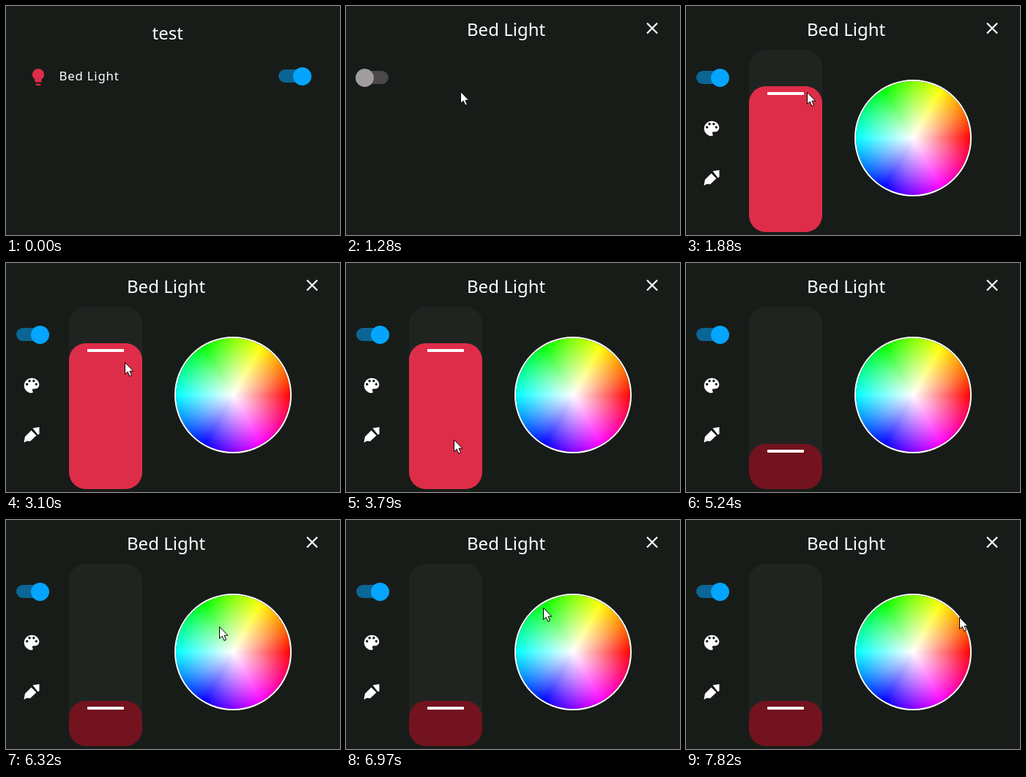
An HTML page that plays this animation: 456x314 px, repeating every 8000 ms.

```html
<!DOCTYPE html>
<html lang="en">
<head>
<meta charset="utf-8">
<title>Light control</title>
<style>
  html, body { margin: 0; width: 456px; height: 314px; overflow: hidden; background: #181c18; }
  svg, #wheel { position: absolute; left: 0; top: 0; }
  #wheel {
    left: 230px; top: 101px; width: 156px; height: 156px;
    border: 2px solid #fff; border-radius: 50%;
    background:
      radial-gradient(closest-side, #fff, #fff0) padding-box,
      conic-gradient(from 90deg, red, magenta, blue, cyan, lime, yellow, red) padding-box;
  }
  text { font: 24px "Noto Sans", sans-serif; fill: #fff; }
  .row { font-size: 16.8px; letter-spacing: .8px; }
  .track { fill: #0b6695; }
  .thumb { fill: #03a5ff; }
  .off .track { fill: #4a484a; }
  .off .thumb { fill: #a09c9f; }
</style>
</head>
<body>
<div id="wheel"></div>
<svg width="456" height="314" fill="#fff">
  <defs>
    <g id="track"><rect x="14" y="89" width="44" height="18" rx="9"/></g>
    <clipPath id="shell"><rect x="86" y="60" width="100" height="250" rx="23"/></clipPath>
  </defs>

  <g id="card">
    <text x="199.5" y="46">test</text>
    <path fill="#de2d4b" transform="translate(30.2 83.7) scale(1.15)" d="M12 2A7 7 0 0 0 5 9C5 11.4 6.2 13.5 8 14.7V17A1 1 0 0 0 9 18H15A1 1 0 0 0 16 17V14.7C17.8 13.5 19 11.4 19 9A7 7 0 0 0 12 2M9 20V21A1 1 0 0 0 10 22H14A1 1 0 0 0 15 21V20Z"/>
    <text class="row" x="72.5" y="102">Bed Light</text>
    <g transform="translate(358 -2)">
      <use href="#track" class="track"/>
      <circle class="thumb" cx="46.5" cy="98.5" r="12.5"/>
    </g>
  </g>

  <g id="dialog">
    <text x="165" y="41">Bed Light</text>
    <path d="M411 23.5L425 37.5M425 23.5L411 37.5" stroke="#fff" stroke-width="2.2"/>
    <g id="toggle">
      <use href="#track" class="track"/>
      <circle id="thumb" class="thumb" cy="98.5" r="12.5"/>
    </g>
    <g id="controls">
      <g transform="translate(21.2 154.2) scale(1.15)">
        <path d="M12 3A9 9 0 0 0 12 21A1.5 1.5 0 0 0 13.5 19.5C13.5 18.5 12.7 18.5 12.7 17.5A1.5 1.5 0 0 1 14.2 16H16A5 5 0 0 0 21 11C21 6.6 17 3 12 3Z"/>
        <path d="M6.5 10.5h0M9.5 6.5h0M14.5 6.5h0M17.5 10.5h0" stroke="#181c18" stroke-width="3" stroke-linecap="round"/>
      </g>
      <path d="M36.5 226.5L45.5 225V234.5L43.5 235.5ZM34.5 229.5L41.5 236.5L33 244.5L28.5 244L25 246L24.5 245.5L26 238Z"/>
      <g clip-path="url(#shell)">
        <rect x="86" y="60" width="100" height="250" fill="#202421"/>
        <g id="level">
          <rect id="fill" x="86" width="100" height="250" rx="23"/>
          <rect x="111" y="8" width="50" height="4" rx="1"/>
        </g>
      </g>
    </g>
  </g>

  <path id="cursor" d="M.5 .5V16.5L4.2 13.2L6.8 19.3L9.5 18L7 12.2H11.8Z" stroke="#000"/>
</svg>
<script>
const LOOP = 8000;
const [wheel, card, dialog, toggle, thumb, controls, level, fill, cursor] =
  ['wheel', 'card', 'dialog', 'toggle', 'thumb', 'controls', 'level', 'fill', 'cursor']
    .map(id => document.getElementById(id));

// Pointer stops: time, x, y
const stops = [
  [170, 335, 282], [600, 156, 117], [1310, 156, 117], [1440, 165, 118],
  [3000, 165, 118], [3420, 147, 242], [4280, 147, 242], [4520, 338, 148],
  [6080, 338, 148], [6320, 291, 146], [6560, 278, 140], [6860, 276, 130],
  [6890, 276, 130], [7030, 264, 114], [7220, 276, 129], [7580, 276, 129], [7820, 373, 133]
];

const progress = (t, from, to) => Math.min(1, Math.max(0, (t - from) / (to - from)));
const smooth = p => p * p * (3 - 2 * p);
const between = (t, from, to) => t >= from && t < to;
const show = (el, on) => el.style.visibility = on ? 'visible' : 'hidden';

function pointerAt(t) {
  let i = 1;
  while (i < stops.length - 1 && t > stops[i][0]) i++;
  const [t0, x0, y0] = stops[i - 1], [t1, x1, y1] = stops[i];
  const p = smooth(progress(t, t0, t1));
  return [x0 + (x1 - x0) * p, y0 + (y1 - y0) * p].map(Math.round);
}

function draw(t) {
  const open = progress(t, 690, 840);
  card.style.opacity = 1 - open;
  dialog.style.opacity = open;

  const ready = t >= 1310;
  show(controls, ready);
  show(wheel, ready);
  toggle.classList.toggle('off', !ready);
  thumb.setAttribute('cx', 25.5 + 21 * smooth(progress(t, 1290, 1440)));

  const top = t < 3870 ? 110 : t < 4830 ? 245 : 248;
  show(level, t >= 1880);
  level.setAttribute('transform', `translate(0 ${top})`);
  fill.setAttribute('fill', t < 4830 ? '#de2d49' : '#73131f');

  show(cursor, t >= 170 && !between(t, 2650, 3000) && !between(t, 5240, 6080));
  cursor.setAttribute('transform', `translate(${pointerAt(t)})`);
}

function tick() {
  draw(performance.now() % LOOP);
  requestAnimationFrame(tick);
}
tick();
</script>
</body>
</html>
```
